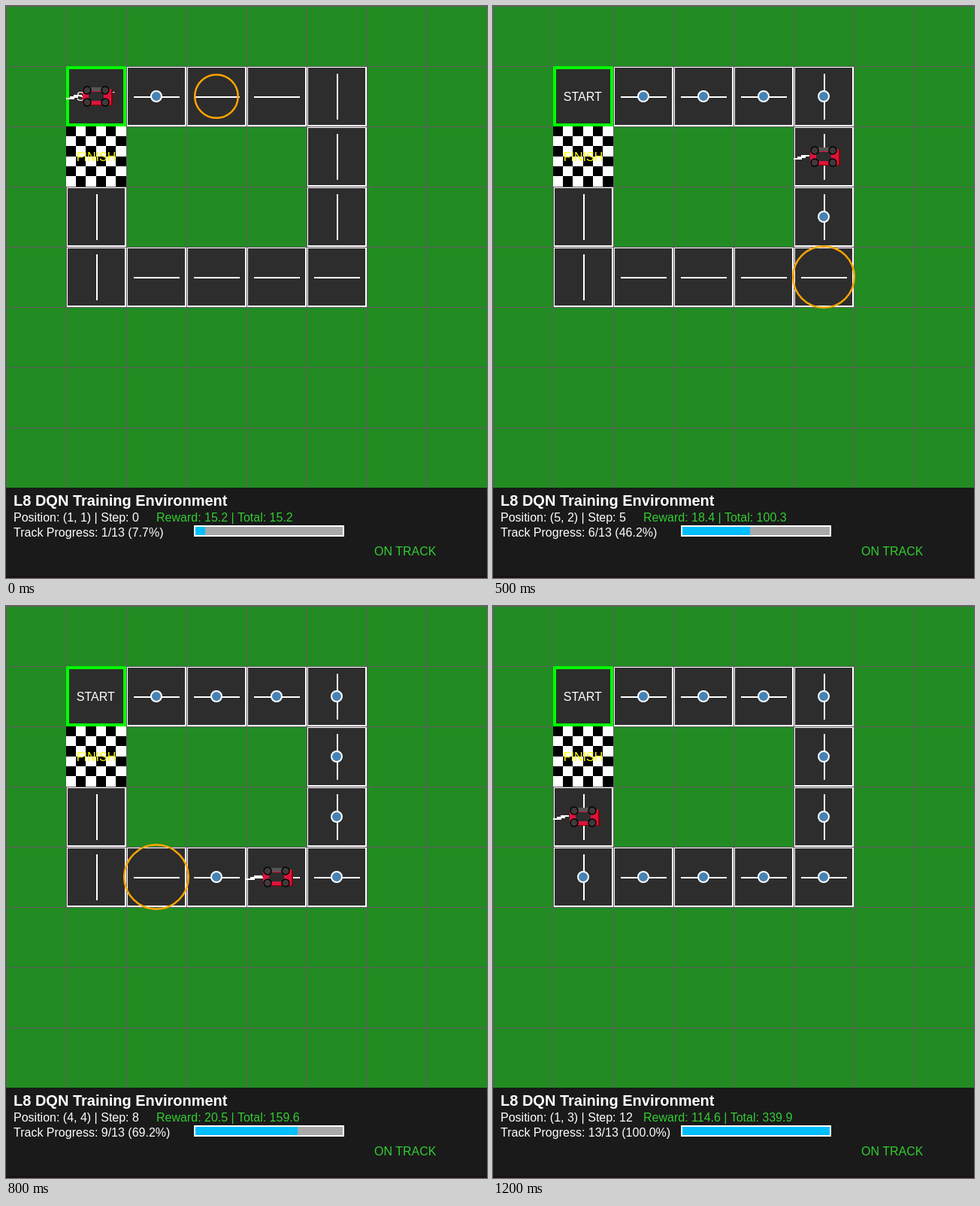
An HTML page for the animation above (1.3 s loop, 640 by 760 pixels).

```html
<!DOCTYPE html>
<html lang="en">
<head>
<meta charset="utf-8">
<title>DQN Training Environment</title>
<style>
  html, body { margin: 0; width: 100%; height: 100%; overflow: hidden; background: #1a1a1a; }
  svg { display: block; }
  text { font: 16px "Liberation Sans", Arial, sans-serif; fill: #fff; white-space: pre; }
  .title { font-size: 20px; font-weight: bold; }
  .good { fill: #32cd32; }
</style>
</head>
<body>
<svg id="stage" width="640" height="760" viewBox="0 0 640 760"></svg>
<script>
const CELL = 80, STEP_MS = 100;
const route = [[1,1],[2,1],[3,1],[4,1],[5,1],[5,2],[5,3],[5,4],[4,4],[3,4],[2,4],[1,4],[1,3],[1,2]];
const STEPS = route.length - 1;
const verticalCells = new Set([4, 5, 6, 11, 12]);
const rewards = [15.2, 15.7, 16.3, 17, 17.7, 18.4, 19.1, 19.8, 20.5, 21.2, 21.9, 22.6, 114.6];
const totals = [15.2, 30.9, 47.2, 64.2, 81.9, 100.3, 119.4, 139.1, 159.6, 180.8, 202.7, 225.2, 339.9];

const stage = document.getElementById("stage");

function add(parent, tag, attrs, content) {
  const node = document.createElementNS("http://www.w3.org/2000/svg", tag);
  for (const key in attrs) node.setAttribute(key, attrs[key]);
  if (content) node.textContent = content;
  return parent.appendChild(node);
}
const rect = (parent, x, y, width, height, fill, extra) =>
  add(parent, "rect", { x, y, width, height, fill, ...extra });
const frame = (x, y, w, h, line, color) =>
  rect(stage, x + line / 2, y + line / 2, w - line, h - line, "none", { stroke: color, "stroke-width": line });
const label = (x, y, content, cls = "") => add(stage, "text", { x, y, class: cls }, content);
const center = i => route[i].map(n => (n + 0.5) * CELL);
const corner = i => route[i].map(n => n * CELL);

function drawRoad(i) {
  const [x, y] = corner(i);
  rect(stage, x, y, CELL, CELL, "#2d2d2d");
  frame(x, y, CELL, CELL, 2, "#fff");
  if (i === 0) return;
  if (verticalCells.has(i)) rect(stage, x + 40, y + 10, 2, 61, "#fff");
  else rect(stage, x + 10, y + 40, 61, 2, "#fff");
}

function drawGrid() {
  for (let p = 0; p < 640; p += CELL) {
    rect(stage, p, 0, 1, 640, "#645a64");
    rect(stage, 0, p, 640, 1, "#645a64");
  }
}

function drawFinish(x, y) {
  const edge = n => Math.floor(n * CELL / 6);
  for (let row = 0; row < 6; row++)
    for (let col = 0; col < 6; col++)
      rect(stage, x + edge(col), y + edge(row), edge(col + 1) - edge(col), edge(row + 1) - edge(row),
        (row + col) % 2 ? "#fff" : "#000");
}

function drawCar() {
  const car = add(stage, "g", {});
  for (let i = 0; i < 3; i++) rect(car, -30 - 5 * i, -2 + 2 * i, 11, 2, "#fff");
  rect(car, -16, -8, 38, 20, "#8b0000");
  rect(car, -18, -10, 38, 21, "#dc143c");
  rect(car, -9, -12, 19, 5, "#555");
  add(car, "path", { d: "M-7-6H7L10-3V3L7 6H-7L-10 3V-3Z", fill: "#2d2d2d" });
  for (const cx of [-12, 12])
    for (const cy of [-8, 8])
      add(car, "circle", { cx, cy, r: 5, fill: "#3c3c3c", stroke: "#000", "stroke-width": 1.5 });
  return car;
}

rect(stage, 0, 0, 640, 640, "#228b22");
for (let i = 0; i < STEPS; i++) drawRoad(i);
drawGrid();
frame(80, 80, CELL, CELL, 4, "#0f0");
label(93.8, 126, "START");
drawFinish(...corner(STEPS));
label(93.8, 206, "FINISH").style.fill = "#ff0";

const dots = route.slice(0, STEPS).map((_, i) => {
  const [cx, cy] = center(i);
  return add(stage, "circle", { cx, cy, r: 7, fill: "#4682b4", stroke: "#fff", "stroke-width": 2 });
});
const target = add(stage, "circle", { fill: "none", stroke: "#ffa500", "stroke-width": 2.5 });
const car = drawCar();

rect(stage, 0, 640, 640, 120, "#1a1a1a");
rect(stage, 0, 757, 640, 3, "#1a1216");
label(10, 664, "L8 DQN Training Environment", "title");
const positionText = label(10, 685);
const rewardText = label(200, 685, "", "good");
const progressText = label(10, 705);
label(490, 730, "ON TRACK", "good");
rect(stage, 250, 690, 200, 15, "#a9a9a9");
const bar = rect(stage, 250, 690, 0, 15, "#00bfff");
frame(250, 690, 200, 15, 2, "#fff");

function show(step) {
  const [col, row] = route[step], done = step + 1;
  car.setAttribute("transform", `translate(${center(step)})`);
  dots.forEach((dot, i) =>
    dot.setAttribute("visibility", i > 0 && i <= done && i !== step ? "visible" : "hidden"));

  const hasTarget = step + 2 < route.length;
  target.setAttribute("visibility", hasTarget ? "visible" : "hidden");
  if (hasTarget) {
    const [cx, cy] = center(step + 2);
    const radius = 30 + Math.trunc(15 * Math.sin(0.22 * step - 0.055));
    target.setAttribute("cx", cx);
    target.setAttribute("cy", cy);
    target.setAttribute("r", radius - 1.25);
  }

  positionText.textContent = `Position: (${col}, ${row}) | Step: ${step}`;
  rewardText.textContent = `Reward: ${rewards[step].toFixed(1)} | Total: ${totals[step].toFixed(1)}`;
  progressText.textContent = `Track Progress: ${done}/${STEPS} (${(done / STEPS * 100).toFixed(1)}%)`;
  bar.setAttribute("width", Math.floor(200 * done / STEPS));
}

const start = performance.now();
let shown = -1;
function tick() {
  const step = Math.floor((performance.now() - start) / STEP_MS) % STEPS;
  if (step !== shown) show(shown = step);
  requestAnimationFrame(tick);
}
tick();
</script>
</body>
</html>
```
